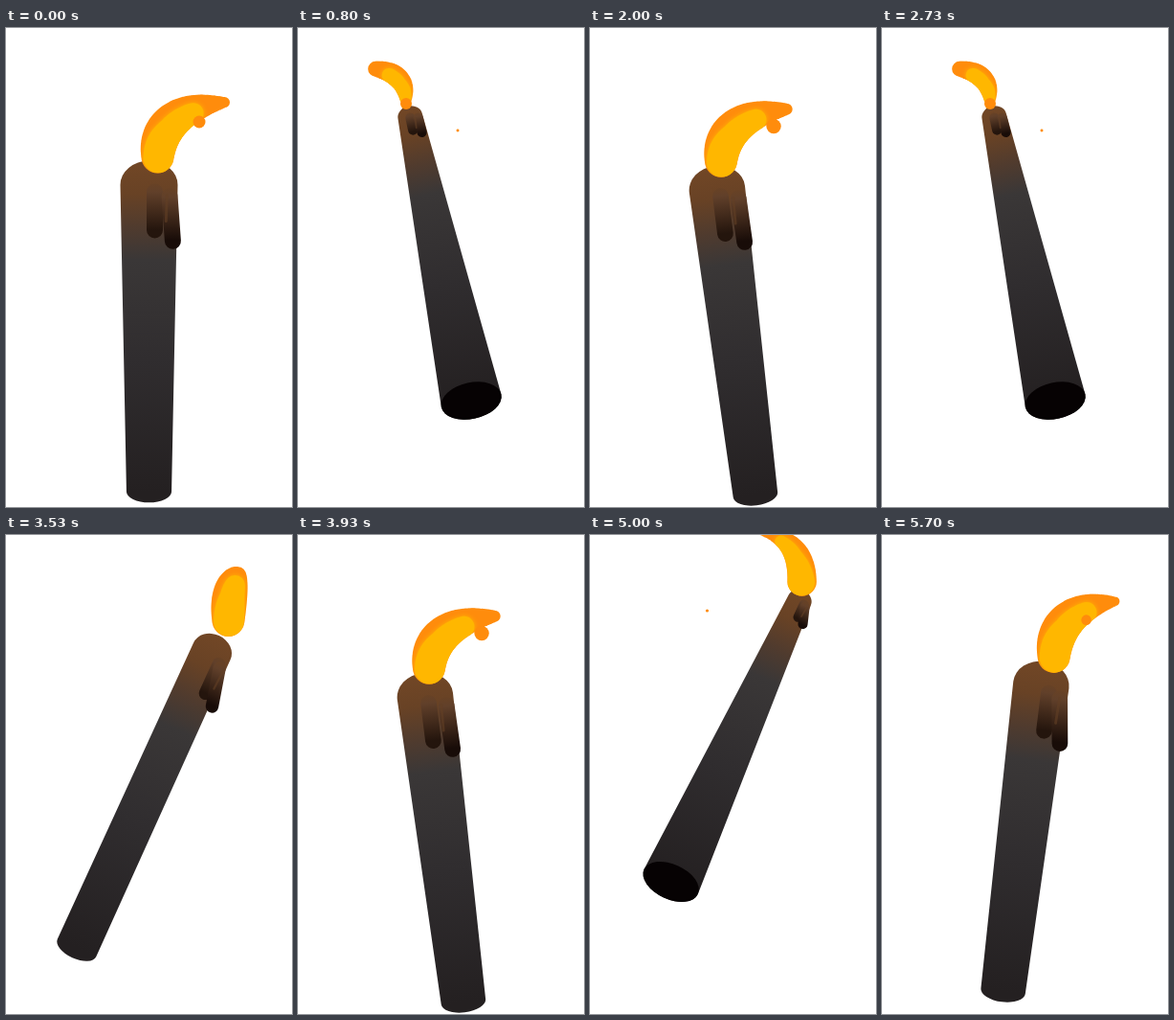
An HTML page with a canvas for the animation above (5.73 s loop, 299 by 500 pixels).

```html
<!DOCTYPE html>
<html>
<head>
<meta charset="utf-8">
<style>
  html, body { margin: 0; width: 100%; height: 100%; overflow: hidden; background: #fff; }
  canvas { display: block; }
</style>
</head>
<body>
<canvas id="stage" width="299" height="500"></canvas>
<script>
const ctx = document.getElementById('stage').getContext('2d');
const LOOP = 5730, CYCLE = 48, ORANGE = '#ff8c0c', YELLOW = '#ffb700';
const bump = (k, mid, width) => Math.exp(-(((k - mid) / width) ** 2));
const clamp01 = v => Math.max(0, Math.min(1, v));

// Ends of the candle as it circles towards and away from the viewer
function pose(k) {
  const a = k / CYCLE * 2 * Math.PI;
  const c = Math.cos(a), s = Math.sin(a), c2 = Math.cos(2 * a), s2 = Math.sin(2 * a);
  const sway = Math.sin(a + 0.087 * (1 - c));
  return {
    k, c, s, c2,
    tx: 149.5 - (89 - 13 * c - 5 * s) * sway,
    ty: 103.5 + 38 * c + 23 * s - c2 - 2 * Math.cos(3 * a),
    tw: 37.2 + 16.6 * c + 6.2 * c2,
    bx: 149.5 + 89.5 * sway,
    by: 423.5 + 57.5 * c + 24.6 * s + 3 * c2 - 1.8 * s2,
    bw: 52.3 - 10.5 * c + 5.3 * c2
  };
}

function fade(y0, y1, stops) {
  const g = ctx.createLinearGradient(0, y0, 0, y1);
  stops.forEach(([at, color]) => g.addColorStop(at, color));
  return g;
}

function line(x0, y0, x1, y1, width, style) {
  ctx.lineWidth = width;
  ctx.strokeStyle = style;
  ctx.beginPath();
  ctx.moveTo(x0, y0);
  ctx.lineTo(x1, y1);
  ctx.stroke();
}

// Starts in the body colour inside the edge, then darkens downwards
function drip(x, end, w, edge, color) {
  const start = end * 0.4;
  line(Math.min(x, edge - w / 2), start, x, end - w / 2, w, fade(start - w / 2, end, [
    [0, '#684225'], [0.15, '#61402a'], [0.85, color], [1, color]
  ]));
}

function candle(p) {
  const len = Math.hypot(p.bx - p.tx, p.by - p.ty);
  const top = p.tw / 2, base = p.bw / 2, cap = p.tw * 0.42, depth = p.bw * (0.27 - 0.03 * p.c);
  ctx.save();
  ctx.translate(p.tx, p.ty);
  ctx.rotate(Math.atan2(p.tx - p.bx, p.by - p.ty));
  ctx.lineCap = 'round';

  ctx.fillStyle = fade(0, len, [
    [0, '#724726'], [0.1, '#684225'], [0.2, '#503b2e'], [0.3, '#3a3737'],
    [0.6, '#302d2f'], [1, '#242021']
  ]);
  ctx.beginPath();
  ctx.ellipse(0, cap, top, cap, 0, Math.PI, 2 * Math.PI);
  ctx.lineTo(base, len);
  ctx.ellipse(0, len, base, depth, 0, 0, Math.PI);
  ctx.closePath();
  ctx.fill();

  // Underside, seen while the base points at the viewer
  ctx.globalAlpha = clamp01((-p.c - 0.3) / 0.4);
  ctx.fillStyle = '#060203';
  ctx.beginPath();
  ctx.ellipse(0, len, base, depth, 0, 0, 2 * Math.PI);
  ctx.fill();
  ctx.globalAlpha = 1;

  const reach = 54 + 27 * p.c, w = 5 + p.tw * 0.2;
  const x1 = top * (0.2 - 0.42 * p.s), x2 = top * (0.83 - 0.35 * p.s);
  drip(x1, reach, w, top, '#24150d');
  drip(x2, reach * 1.14, w, top, '#180c08');
  const shine = x2 - w * 0.36;
  line(shine, reach * 0.45, shine - 1, reach * 0.78, w * 0.17, 'rgba(98,64,36,.6)');
  ctx.restore();
}

function flame(p) {
  const { k, c, s, c2 } = p;
  const far = bump(k, 22, 5);
  const x = p.tx + 9 * c - 6 * s + 10 * far;
  const y = p.ty - 20 + 16 * c * c;
  const dx = 2.5 + 53 * c + 9 * s + 14.5 * c2;
  const dy = -(41 + 10.7 * c - 7 * s + 5.2 * c2 + 16 * bump(k, 31, 4));
  const r0 = 17 - 12.5 * far;
  const r1 = Math.max(3, 5.5 + 9.5 * s * Math.abs(s));
  const rc = 2 * (14.8 + 3.7 * c - far) - (r0 + r1) / 2;
  const lean = Math.min(1, Math.abs(dx) / 25);

  // Circles along a bent spine; inset moves them into the bend
  const blob = (end, inset) => {
    const path = new Path2D();
    for (let i = 0; i <= 60; i++) {
      const t = i / 60 * end, u = 1 - t, m = 2 * t * u;
      const r = u * u * r0 + m * rc + t * t * r1;
      const cut = r * inset * Math.min(1, 0.25 + 2 * t);
      const px = x + t * t * dx + cut * lean * Math.sign(dx) * 0.7;
      const py = y + (m * 0.88 + t * t) * dy + cut * 0.8;
      path.moveTo(px + r - cut, py);
      path.arc(px, py, r - cut, 0, 2 * Math.PI);
    }
    return path;
  };

  const outer = blob(1, 0);
  ctx.save();
  ctx.fillStyle = ORANGE;
  ctx.fill(outer);
  ctx.clip(outer);
  ctx.fillStyle = ctx.shadowColor = YELLOW;
  ctx.shadowBlur = 5;
  ctx.fill(blob(0.52 + 0.18 * lean, 0.28));
  ctx.restore();
}

function spark(x, y, r) {
  if (r <= 0) return;
  ctx.fillStyle = ORANGE;
  ctx.beginPath();
  ctx.arc(x, y, r, 0, 2 * Math.PI);
  ctx.fill();
}

function sparks(k) {
  const a = k > 40 ? k - CYCLE : k;
  if (a >= -4) {
    spark(167 + 35 * Math.max(0, 1 - a / 13) ** 2, 107 - 9 * 0.7 ** a,
      Math.min(8, 6.5 + a * 0.6, (21.8 - a) * 0.82));
  }
  if (k >= 4 && k < 20) {
    spark(133 + 22 * 0.65 ** (k - 4), 75 + 6 * 0.65 ** (k - 4), Math.min(7, k - 1, 19 - k));
  }
  if (k >= 18 && k < 32) {
    spark(125 - 12 * 0.84 ** (k - 20), 79, Math.min(6, k - 14, (31 - k) * 0.8));
  }
}

function draw(now) {
  // 25 steps a second on a 30 per second clock, whose ticks round to 10 ms
  const tick = Math.floor((now % LOOP + 4) * 0.03);
  const p = pose(Math.floor(tick * 5 / 6) % CYCLE);
  ctx.fillStyle = '#fff';
  ctx.fillRect(0, 0, 299, 500);
  candle(p);
  flame(p);
  sparks(p.k);
}

const begin = performance.now();
function play() {
  draw(performance.now() - begin);
  requestAnimationFrame(play);
}
play();
</script>
</body>
</html>
```
